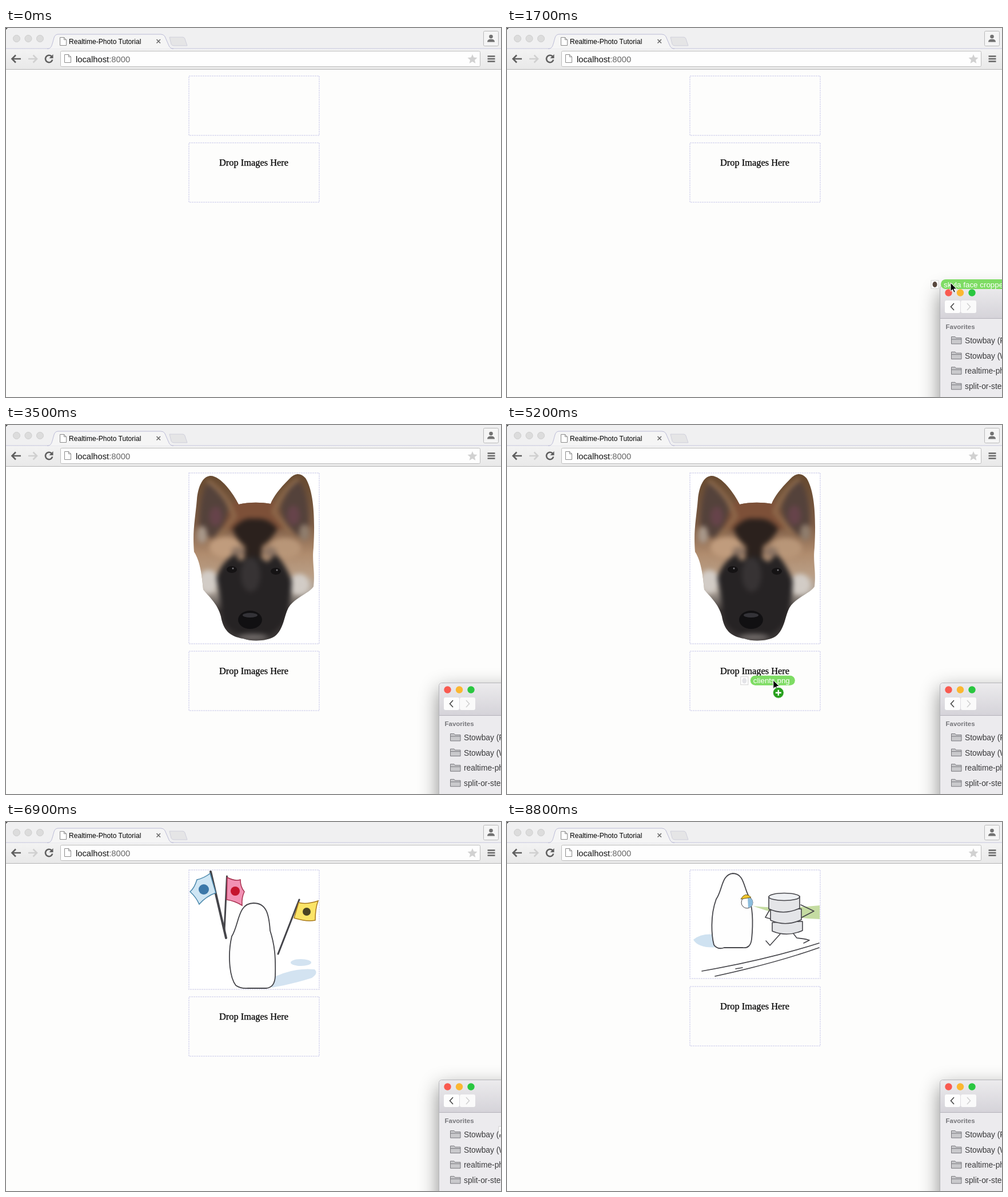
An HTML page that plays this animation: 866x646 px, repeating every 8900 ms.

```html
<!DOCTYPE html>
<html lang="en">
<head>
<meta charset="utf-8">
<title>Drop demo</title>
<style>
html, body { margin: 0; width: 100%; height: 100%; overflow: hidden; background: #fdfdfc }
svg { display: block; font-family: "Liberation Sans", Arial, sans-serif }
.line { fill: none; stroke: #45454a; stroke-width: 1.6; stroke-linejoin: round; stroke-linecap: round }
.box { fill: none; stroke: #e3e3f3; stroke-width: 2; stroke-dasharray: 3 1 }
.soft { filter: blur(4px) }
.body { fill: #fefefe; stroke: #45454a; stroke-width: 1.8 }
#finder { filter: drop-shadow(0 12px 17px rgba(0,0,0,.45)) }
</style>
</head>
<body>
<svg width="866" height="646" viewBox="0 0 866 646">
  <defs>
    <linearGradient id="bar" x2="0" y2="1"><stop stop-color="#f3f3f3"/><stop offset="1" stop-color="#e9e9e9"/></linearGradient>
    <linearGradient id="title" x2="0" y2="1"><stop stop-color="#ecebed"/><stop offset="1" stop-color="#d5d3d9"/></linearGradient>
    <linearGradient id="fur" x2="0" y2="1">
      <stop stop-color="#66492f"/><stop offset=".3" stop-color="#7d5c45"/><stop offset=".48" stop-color="#b08c6e"/>
      <stop offset=".6" stop-color="#b99e85"/><stop offset=".7" stop-color="#b5aba1"/><stop offset=".82" stop-color="#3b3534"/><stop offset="1" stop-color="#393535"/>
    </linearGradient>
    <path id="head" d="M357 89C344 90 336 108 334 130C331 165 326 185 329 222C338 236 342 255 345 288C354 300 370 312 376 335C380 358 390 370 415 374C432 380 458 378 470 370C486 358 486 335 494 320C505 302 530 295 538 283C541 255 535 240 538 215C541 160 538 115 524 93C515 83 505 84 495 95C478 112 468 125 463 138C445 135 425 135 407 139C398 120 375 88 357 89Z"/>
    <clipPath id="headClip"><use href="#head"/></clipPath>
    <path id="page" d="M0 0H7L11 4V14H0ZM7 0V4H11" fill="#fff" stroke="#8a8a8a"/>
    <g id="folder" stroke="#77777c" fill="#c9c9cc"><path d="M.5 14V1.500H7L8.500 3.500H18V14Z"/><path d="M.5 6H18"/></g>
  </defs>

  <rect width="866" height="646" fill="#fdfdfc"/>

  <!-- browser -->
  <rect width="866" height="36" fill="#f0f0f1"/>
  <path d="M0 0H3L0 3Z" fill="#444"/>
  <g fill="#dcdcdc" stroke="#cdcdcd"><circle cx="18.500" cy="18.500" r="6"/><circle cx="39" cy="18.500" r="6"/><circle cx="59.500" cy="18.500" r="6"/></g>
  <rect y="36" width="866" height="36" fill="url(#bar)"/>
  <path d="M0 36H866" stroke="#c5c5dd"/>
  <path d="M72 36.500C80 36 80 31 84 17Q86 11 91 11H271Q276 11 278 15L285 31Q287 36 293 36.500" fill="#f5f5f5" stroke="#bbbbd6"/>
  <path d="M286 16H309Q312 16 313 19L317 31H294Q290 31 289 28Z" fill="#e5e5e6" stroke="#cfcfdb"/>
  <path d="M0 72.500H866" stroke="#b4b4b4"/>
  <use href="#page" x="94.500" y="16.500"/>
  <text x="110" y="28" font-size="12.1">Realtime-Photo Tutorial</text>
  <path d="M263.500 20L270 26.500M270 20L263.500 26.500" stroke="#666" stroke-width="1.500"/>
  <rect x="835.500" y="5.500" width="26" height="26" rx="2" fill="#f5f5f5" stroke="#b9b9b9"/>
  <g fill="#727272"><circle cx="848.500" cy="15" r="3.300"/><path d="M842 24.500Q842 19.500 848.500 19.500T855 24.500Z"/></g>
  <g fill="none" stroke-width="2.600">
    <path d="M26 54H11M17 47.500L10.500 54L17 60.500" stroke="#5f5f5f"/>
    <path d="M39 54H54M47.500 47.500L54 54L47.500 60.500" stroke="#d0d0d0"/>
    <path d="M79.500 49.500A6.200 6.200 0 1 0 81.200 55.500" stroke="#5f5f5f"/>
  </g>
  <path d="M82.500 46V53H75.500Z" fill="#5f5f5f"/>
  <rect x="95.500" y="40.500" width="734" height="27" rx="2" fill="#fefefe" stroke="#bcbcbc"/>
  <use href="#page" x="102.500" y="46.500"/>
  <text x="122" y="59.500" font-size="14.750" fill="#111">localhost<tspan fill="#666">:8000</tspan></text>
  <path d="M816 46L818.400 51.500L824.500 52L820 56L821.300 62L816 58.800L810.700 62L812 56L807.500 52L813.600 51.500Z" fill="#d1d1d1"/>
  <path d="M842.500 49.500H855.500M842.500 54H855.500M842.500 58.500H855.500" stroke="#666" stroke-width="2.500"/>

  <!-- pictures -->
  <g class="card"></g>
  <g class="card">
    <rect x="321" y="85" width="226" height="297" fill="#fff"/>
    <use href="#head" fill="url(#fur)"/>
    <g clip-path="url(#headClip)">
      <g class="soft">
        <path d="M400 132H468L490 180L433 190L375 180Z" fill="#7d5038"/>
        <path d="M356 100C343 108 337 150 338 188L362 198Q390 168 388 146Q376 110 356 100Z" fill="#54423b"/>
        <path d="M511 97C525 108 532 150 529 182L512 195Q479 165 481 143Q492 110 511 97Z" fill="#54423b"/>
        <ellipse cx="367" cy="160" rx="11" ry="17" fill="#66434a"/><ellipse cx="503" cy="158" rx="11" ry="17" fill="#66434a"/>
        <path d="M352 97Q385 120 400 160L372 196" fill="none" stroke="#936f50" stroke-width="6"/>
        <path d="M512 94Q485 112 468 152L498 190" fill="none" stroke="#936f50" stroke-width="6"/>
        <ellipse cx="343" cy="192" rx="9" ry="15" fill="#a8988a"/><ellipse cx="522" cy="188" rx="9" ry="14" fill="#8f7d6d"/>
        <ellipse cx="384" cy="214" rx="28" ry="18" fill="#c09c7d"/><ellipse cx="488" cy="216" rx="28" ry="18" fill="#b89678"/>
        <path d="M396 182Q415 160 434 164Q460 161 475 182Q464 202 448 212L446 245H417L418 212Q404 203 396 182Z" fill="#2b211d"/>
        <ellipse cx="406" cy="222" rx="12" ry="9" fill="#8d7564"/><ellipse cx="462" cy="222" rx="12" ry="9" fill="#8d7564"/>
        <ellipse cx="354" cy="274" rx="17" ry="20" fill="#d2ccc6"/><ellipse cx="513" cy="279" rx="18" ry="18" fill="#d2ccc6"/>
        <path d="M368 268Q376 240 400 226L410 238Q433 220 457 240L472 226Q488 242 500 272Q500 310 486 345Q468 372 432 373Q398 370 380 345Q376 310 368 268Z" fill="#262324"/>
        <ellipse cx="428" cy="262" rx="17" ry="30" fill="#373334"/>
        <ellipse cx="432" cy="371" rx="26" ry="5" fill="#77716f"/>
      </g>
      <ellipse cx="395" cy="253" rx="9" ry="6" fill="#151314"/><ellipse cx="472" cy="256" rx="9" ry="6" fill="#151314"/>
      <circle cx="397" cy="251" r="1.500" fill="#77757a"/><circle cx="474" cy="254" r="1.500" fill="#77757a"/>
      <ellipse cx="427" cy="341" rx="21" ry="16" fill="#111012"/><ellipse cx="427" cy="333" rx="13" ry="4" fill="#343338"/>
    </g>
  </g>
  <g class="card">
    <rect x="321" y="85" width="226" height="207" fill="#fff"/>
    <g fill="#d3e3f1"><path d="M460 276Q500 254 540 258Q547 265 535 273Q500 284 465 290Z"/><ellipse cx="516" cy="246" rx="18" ry="6"/></g>
    <g class="line"><path d="M358 87L385 203" stroke-width="4"/><path d="M386.500 95L382 190" stroke-width="3"/><path d="M513 136L476 231" stroke-width="3"/></g>
    <path d="M357 90Q347 98 334 101Q330 115 322 122Q333 132 338 144Q350 130 367 124Z" fill="#cfe6f4" stroke="#4a88ac" stroke-width="1.500"/>
    <path d="M387 97Q400 104 410 101Q410 114 417 122Q412 132 413 146Q400 138 386 136Z" fill="#f291b4" stroke="#a83250" stroke-width="1.500"/>
    <path d="M512 141Q525 145 546 138Q541 152 541 172Q525 175 504 168Z" fill="#fbe467" stroke="#a8791e" stroke-width="1.500"/>
    <circle cx="346" cy="118" r="9" fill="#3b78a9"/><circle cx="401" cy="121" r="8" fill="#c5152f"/><circle cx="526" cy="157" r="7" fill="#4a4323"/>
    <path class="body" d="M433 142C405 142 408 180 395 200C388 230 390 270 402 286Q410 292 424 291H455Q470 290 471 270C472 235 470 215 462 190C460 160 455 142 433 142Z"/>
  </g>
  <g class="card">
    <rect x="321" y="85" width="226" height="189" fill="#fff"/>
    <path d="M326 206Q342 193 370 198V219Q335 222 326 206Z" fill="#cfe2f1"/>
    <path d="M430 147Q480 153 547 146V170Q490 169 430 147Z" fill="#c5dca2"/>
    <path class="body" d="M395 90C375 92 377 120 366 135C355 165 358 200 362 215Q368 224 380 220H412Q426 222 428 205C431 175 430 150 423 130C414 115 415 90 395 90Z"/>
    <circle cx="420" cy="141" r="10" fill="#fff" stroke="#45454a"/><path d="M421 132Q431 134 430 142Q429 149 422 150Z" fill="#8bbcdc"/><path d="M409 135Q417 121 427 132Z" fill="#f1c62c" stroke="#6b5a20"/>
    <g class="line">
      <path d="M478 196L460 216L453 208M500 194L507 203Q520 204 529 207L519 212M514 145L537 156L514 168M460 153L452 167L463 170"/>
      <g fill="#e4e5e8"><path d="M464 176V191Q490 202 517 190V174Z"/><path d="M461 154V172Q488 184 515 171V152Z"/><path d="M458 131V152Q484 164 512 151V130Z"/><ellipse cx="485" cy="131" rx="27" ry="6.500" fill="#eef0f3"/></g>
      <path d="M341 261Q455 241 546 212M364 270Q470 247 546 220M400 257L412 255"/>
    </g>
  </g>
  <rect id="frame" class="box" x="320" y="84" width="228"/>
  <g id="drop">
    <rect class="box" x="320" y="1" width="228" height="104"/>
    <text x="433.500" y="41" font-size="16.400" text-anchor="middle" font-family="Liberation Serif, Times New Roman, serif" stroke="#000" stroke-width=".25">Drop Images Here</text>
  </g>

  <!-- file window -->
  <g id="finder">
    <rect x="757.500" y="451.500" width="300" height="400" rx="5" fill="#ecebee" stroke="#b5b5b9"/>
    <path d="M758 508V457Q758 452 763 452H1000V508Z" fill="url(#title)"/>
    <path d="M758 508.500H1000" stroke="#b4b2ba"/>
    <circle cx="772.500" cy="463.500" r="6.200" fill="#f95a50"/><circle cx="793" cy="463.500" r="6.200" fill="#fbb731"/><circle cx="813.500" cy="463.500" r="6.200" fill="#2ac740"/>
    <rect x="766" y="477" width="27" height="22" rx="3" fill="#fdfdfd"/><rect x="794" y="477" width="27" height="22" rx="3" fill="#fafafa"/>
    <path d="M782 482L776.500 488L782 494" fill="none" stroke="#444" stroke-width="1.600"/><path d="M805 482L810.500 488L805 494" fill="none" stroke="#d0d0d0" stroke-width="1.600"/>
    <text x="767.500" y="527" font-size="11.500" font-weight="bold" fill="#77777b">Favorites</text>
    <g id="places" font-size="13.800" fill="#3a3a3c"></g>
  </g>

  <!-- pointer and dragged file -->
  <g id="pointer">
    <g id="file">
      <rect id="thumb" width="13" height="14" fill="#fff" stroke="#d2d2d2"/>
      <ellipse id="spot" rx="4" ry="5"/>
      <rect id="pill" height="17" rx="8.500" fill="#7edc64"/>
      <text id="label" font-size="13.400" fill="#fff"></text>
    </g>
    <path d="M0 0V15L3.500 11.800L6 17.200L8.300 16.200L5.900 10.900H10.600Z" stroke="#fff"/>
    <g id="plus"><circle cx="9" cy="22" r="9.500" fill="#27a01c" stroke="#e8f3e6"/><path d="M4 22H14M9 17V27" stroke="#fff" stroke-width="2.400"/></g>
  </g>
</svg>
<script>
const $ = id => document.getElementById(id);
const LOOP = 8900, STEP = 100;

$('places').innerHTML = ['Stowbay (Personal)', 'Stowbay (Work)', 'realtime-photo', 'split-or-steal', 'projects']
  .map((name, i) => `<use href="#folder" x="777" y="${539 + i * 26.6}"/><text x="801" y="${552 + i * 26.6}">${name}</text>`).join('');

// [start, picture index, bottom of picture box, top of drop box]
const pictures = [[0, 0, 189, 200], [2900, 1, 384, 395], [5500, 2, 294, 305], [8200, 3, 275, 287]];

// dx, dy: label corner relative to the pointer
const files = [
  { name: 'skyla face cropped3.png', from: 1300, over: 2600, to: 2700, dx: -17, dy: -6, w: 154, spot: '#58483f' },
  { name: 'clients.png', from: 4100, over: 4900, to: 5200, dx: -40, dy: -8, w: 78, spot: '#e4e4e8' },
  { name: 'quickstart.png', from: 6900, over: 7600, to: 7900, dx: -51, dy: -9, w: 94, spot: '#e4e4e8' }
];

// [time, x, y] of the pointer tip
const path = [
  [0, 930, 540], [1300, 930, 540], [1700, 776, 446], [2500, 432, 247], [2800, 432, 247], [3400, 930, 540],
  [4100, 930, 540], [4900, 470, 440], [5400, 465, 448], [5800, 476, 457], [6400, 930, 540],
  [6900, 930, 540], [7700, 457, 326], [8000, 457, 326], [8600, 930, 540], [LOOP, 930, 540]
];

const show = (el, on) => el.style.display = on ? '' : 'none';
const set = (el, attrs) => { for (const k in attrs) el.setAttribute(k, attrs[k]); };

function pointerAt(t) {
  const i = path.findIndex(p => p[0] > t);
  const [t0, x0, y0] = path[i - 1], [t1, x1, y1] = path[i];
  const u = (t - t0) / (t1 - t0), e = u * (2 - u);
  return [x0 + (x1 - x0) * e, y0 + (y1 - y0) * e];
}

function draw(now) {
  const t = Math.floor(now % LOOP / STEP) * STEP;
  const [, index, bottom, top] = pictures.filter(p => p[0] <= t).pop();
  document.querySelectorAll('.card').forEach((card, i) => show(card, i === index));
  set($('frame'), { height: bottom - 85 });
  set($('drop'), { transform: `translate(0 ${top})` });
  show($('finder'), t >= 800);

  set($('pointer'), { transform: `translate(${pointerAt(t)})` });
  const file = files.find(f => t >= f.from && t <= f.to);
  show($('file'), file);
  show($('plus'), file && t >= file.over);
  if (file) {
    const { dx, dy } = file;
    set($('thumb'), { x: dx - 17, y: dy + 2 });
    set($('spot'), { cx: dx - 10.5, cy: dy + 9, fill: file.spot });
    set($('pill'), { x: dx, y: dy, width: file.w });
    set($('label'), { x: dx + 5, y: dy + 13.5 });
    $('label').textContent = file.name;
  }
  requestAnimationFrame(draw);
}
requestAnimationFrame(draw);
</script>
</body>
</html>
```
